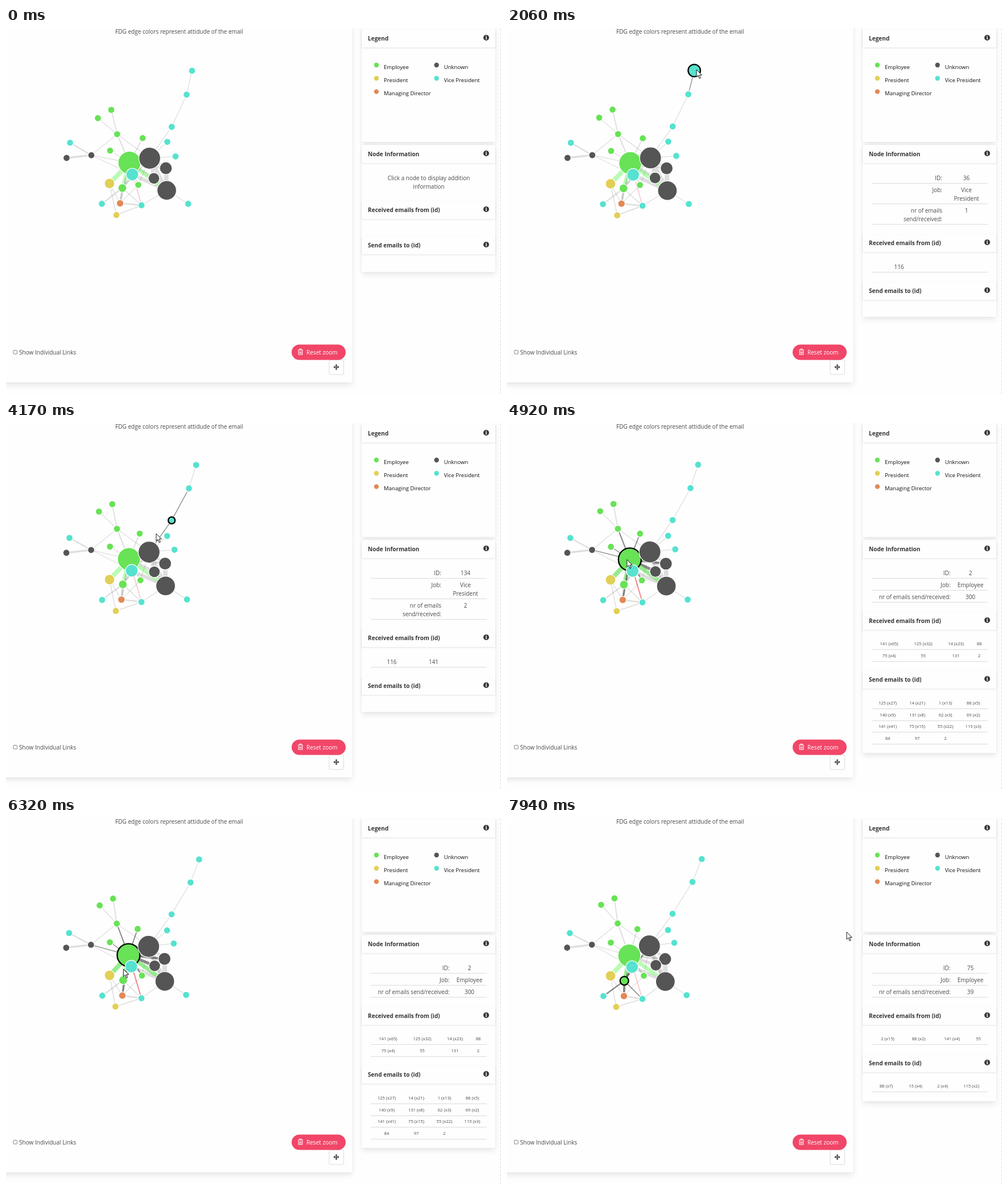
Write an HTML page that moves like this. It is 870 by 644 pixels and loops after 8000 ms.

```html
<!DOCTYPE html>
<html lang="en">
<head>
<meta charset="utf-8">
<title>Email graph</title>
<style>
  html, body { margin: 0; width: 100%; height: 100%; overflow: hidden; background: #fefefe; }
  body { position: relative; font: 10.05px "Open Sans", "Noto Sans", sans-serif; color: #4a4a4a; }
  div, svg { position: absolute; box-sizing: border-box; }
  svg { left: 0; top: 0; }
  text { fill: #4a4a4a; }
  .card { background: #fefefe; box-shadow: 0 5px 10px -1px rgba(10,10,10,.1), 0 0 0 1px rgba(10,10,10,.02); }
  .side { left: 625px; width: 235px; }
  .head { left: 625px; width: 235px; height: 31px; padding-left: 11px; line-height: 31px; font-size: 10.1px;
          font-weight: bold; color: #363636; box-shadow: 0 1px 3px rgba(10,10,10,.11); }
  .head::after { content: "i"; position: absolute; left: 214px; top: 9px; width: 10px; height: 10px; border-radius: 50%;
          background: #363636; color: #fff; font: bold 9px/10px "Noto Serif", serif; text-align: center; }
  .legend text { font-size: 9.6px; fill: #111; }
  .rule { stroke: #dbdbdb; }
</style>
</head>
<body>
<div class="card" style="left:-10px;top:-10px;width:619px;height:632px"></div>
<div class="card side" style="top:-5px;height:205px"></div>
<div id="panels"></div>
<svg id="stage" width="870" height="644">
  <path d="M869.5 1V644" stroke="#ddd" stroke-dasharray="4 3"/>
  <text x="304.300" y="10" text-anchor="middle">FDG edge colors represent attidude of the email</text>
  <g class="legend" id="legend"></g>
  <rect x="13" y="565.500" width="6.500" height="6.500" rx="1" fill="#fff" stroke="#767676" stroke-width=".9"/>
  <text x="23" y="573">Show Individual Links</text>
  <rect x="568" y="582.500" width="25.500" height="25.500" rx="2" fill="#fff" stroke="#dbdbdb"/>
  <path d="M576 595H585M580.500 590.500V599.500" stroke="#363636" stroke-width="1.300"/>
  <path d="M580.500 590l-2.200 2.400h4.400zM580.500 600l-2.200-2.400h4.400zM575.500 595l2.400-2.200v4.400zM585.500 595l-2.400-2.200v4.400z" fill="#363636"/>
  <rect x="502" y="555.500" width="95" height="27" rx="13.500" fill="#f14668"/>
  <path d="M513 565h9M516 565v-1.700h3V565M514.200 566v7h6.600v-7M516.500 567.500v4M518.500 567.500v4" fill="none" stroke="#fff" stroke-width="1.100"/>
  <text x="528" y="573" style="fill:#fff">Reset zoom</text>
  <g id="edges"></g><g id="nodes"></g>
  <path id="cursor" d="M0 0V13L3 10.200L5.200 15.500L7.300 14.600L5.100 9.500H9.300Z" fill="#fff" stroke="#000" stroke-width=".9"/>
</svg>
<script>
const LOOP = 8000;
const $ = id => document.getElementById(id);
const clamp = v => Math.max(0, Math.min(1, v));
const colors = { E: '#68e256', P: '#e2cf56', M: '#e28956', U: '#555', V: '#56e2cf' };

// Side panels
const head = (label, mid) => `<div class="head" style="top:${mid - 15}px">${label}</div>`;
const label = (x, mid, text, anchor = 'middle', size = 10) =>
  `<text x="${x}" y="${mid + size * .36}" text-anchor="${anchor}" font-size="${size}">${text}</text>`;
const rules = ys => ys.map(y => `<path class="rule" d="M641 ${y}H845"/>`).join('');
const cells = (mid, xs, texts, size = 7.6) =>
  texts.split('|').map((s, i) => label(xs[i], mid, s, 'middle', size)).join('');

const wideInfo = (id, count) =>
  label(765, 263, 'ID:', 'end') + label(807.5, 263, id) +
  label(765, 284, 'Job:', 'end') + label(807.5, 284, 'Vice') + label(807.5, 299, 'President') +
  label(765, 320.5, 'nr of emails', 'end') + label(765, 335.5, 'send/received:', 'end') + label(807.5, 320.5, count) +
  rules([272.5, 308.5, 344.5, 428.5]);
const shortInfo = (id, count) =>
  [['ID:', id], ['Job:', 'Employee'], ['nr of emails send/received:', count]].map(([name, value], i) =>
    label(779.5, 263 + i * 21, name, 'end') + label(814.5, 263 + i * 21, value)).join('') +
  rules([272.5, 293.5, 314.5]);

function addPanel(bottom, received, sent, content) {
  const panel = document.createElement('div');
  panel.innerHTML = `<div class="card side" style="top:205px;height:${bottom - 205}px"></div>` +
    head('Node Information', 221) + head('Received emails from (id)', received) + head('Send emails to (id)', sent) +
    `<svg width="870" height="644">${content}</svg>`;
  $('panels').append(panel);
  return panel;
}
const sentCols = [669, 721, 770.5, 819.5], receivedCols = [671.5, 731.5, 789, 830];
const panels = [
  [0, addPanel(428, 319, 381,
    label(743, 263, 'Click a node to display addition') + label(743, 278, 'information'))],
  [1620, addPanel(507, 377, 461, wideInfo(36, 1) + cells(419, [689], '116', 10))],
  [3260, addPanel(507, 377, 461, wideInfo(134, 2) + cells(419, [678, 751.5], '116|141', 10))],
  [4890, addPanel(579, 347, 450, shortInfo(2, 300) +
    cells(387.5, receivedCols, '141 (x65)|125 (x32)|14 (x23)|88') +
    cells(408, receivedCols, '75 (x4)|55|131|2') +
    cells(491, sentCols, '125 (x27)|14 (x21)|1 (x13)|88 (x5)') +
    cells(512, sentCols, '140 (x9)|131 (x8)|62 (x3)|69 (x2)') +
    cells(532.5, sentCols, '141 (x41)|75 (x15)|55 (x22)|115 (x3)') +
    cells(553, sentCols, '84|97|2') + rules([397.5, 418.5, 501.5, 522.5, 542.5, 563.5]))],
  [6620, addPanel(497, 347, 430, shortInfo(75, 39) +
    cells(387.5, [669, 723.5, 782, 828.5], '2 (x15)|88 (x2)|141 (x4)|55') +
    cells(470.5, [666.5, 718, 765.5, 816], '88 (x7)|15 (x4)|2 (x4)|115 (x2)') + rules([397.5, 480.5]))],
];
$('panels').insertAdjacentHTML('afterbegin', head('Legend', 18));

$('legend').innerHTML = [[0, 0, 'E', 'Employee'], [0, 1, 'P', 'President'], [0, 2, 'M', 'Managing Director'],
  [1, 0, 'U', 'Unknown'], [1, 1, 'V', 'Vice President']].map(([col, row, type, name]) =>
  `<circle cx="${651 + col * 105.7}" cy="${65 + row * 23.3}" r="4.200" fill="${colors[type]}"/>
   <text x="${664 + col * 105.7}" y="${71.5 + row * 23.2}">${name}</text>`).join('');

// Graph: key + type, start position, end position
const nodes = {};
const svgElement = (tag, parent, attrs) => {
  const el = document.createElementNS('http://www.w3.org/2000/svg', tag);
  setAttrs(el, attrs);
  parent.append(el);
  return el;
};
function setAttrs(el, attrs) { for (const k in attrs) el.setAttribute(k, attrs[k]); }

const radii = { f: 19, g: 11, h: 10, i: 17, l: 6.3, o: 7.5, p: 9, q: 11, r: 20 };
`rE 217 236.5 215 241.5
fU 252.5 228.5 250.3 224.5
aV 327 75 342.3 72
bV 317.5 117 326 112.2
cV 291.3 173.5 291 168
dV 283.5 199.8 283 196.6
eV 298 225.3 294 219
gU 281 246 278 247.5
iU 282.5 285 278.3 287
hU 260 263.8 261.6 258.3
jV 320.2 308.5 315.7 310.8
sE 232.5 275.3 240.5 276.7
pP 182 272.8 182 277
oE 204.5 280.8 206.2 285.6
qV 222 257 219.8 261.5
kV 238.2 311 238 317.5
lM 200.5 307.6 205.5 312.4
mP 194 328.2 192 331.5
nV 168.5 308.5 169.5 312.5
tE 183 215.2 182.5 218.7
uE 195.3 186.3 194.6 185
vE 161.5 158.2 165.4 152.3
wE 185 143.6 188.8 141
xE 240.2 193.2 229.2 195
yU 150 223.2 149.2 222.3
zU 106.5 228 105.7 227.5
AV 112.5 201.3 110.5 202`.split('\n').forEach(line => {
  const [name, ...pos] = line.split(' ');
  const key = name[0];
  nodes[key] = { from: pos.slice(0, 2).map(Number), to: pos.slice(2).map(Number), r: radii[key] || 6,
    el: svgElement('circle', $('nodes'), { fill: colors[name[1]] }) };
});

// Each edge: two node keys, line width, optional tone (g green, p pink)
const tones = {
  n: ['rgba(80,80,80,.18)', 'rgba(80,80,80,.68)'],
  g: ['rgba(130,250,120,.55)', 'rgba(110,230,100,.72)'],
  p: ['#f9d0d0', '#f28a8f'],
};
const edges = ('ab1.3 bc1.3 cf1.3 df1.3 ef1.3 fg5 fi7 gi8 fh5 hi5 rf6 rg4 rh5 qi6 ri7g rp8g ro6g ij1.3 ik1.3 rk2p ' +
  'kl2.5 km1.7 on2.3 ok1.5 ol3.5 rl3 oq3 of2.5 pm1.5 pl1.3 ru2 uf1.3 uv1.3 uw1.8 uy1.3 rx1.8 ry1.3 yq1.2 ' +
  'yA2.4 yz3.3 rt1.3 rs2 fs1.2 sl1.2').split(' ').map(code => {
  const [, a, b, width, tone] = code.match(/(.)(.)([\d.]+)(\w?)/);
  return { a, b, tone: tones[tone || 'n'], el: svgElement('line', $('edges'), { 'stroke-width': width }) };
});

// Timelines
const drift = [[1600, 0], [2060, .14], [3330, .35], [4920, .58], [5550, .72], [6950, .88], [7940, 1]];
const cursorPath = [[610, 688, 90], [1150, 330, 77], [1580, 333, 73], [2100, 333, 73], [2340, 327, 86],
  [3260, 291, 170], [3850, 291, 171], [4800, 211, 239.5], [5550, 210, 240.5], [5900, 210, 240],
  [6600, 204, 282], [7400, 204, 282], [7650, 778, 348], [7940, 597, 200]];
const selections = [[0, ''], [1150, 'a'], [3260, 'c'], [4890, 'r'], [6620, 'o']];
const hovers = { a: [1150, 2100], c: [3300, 3850], o: [6620, 7400] };

const current = (list, t) => list.filter(([start]) => start <= t).pop()[1];
function sample(keys, t) {
  const next = keys.findIndex(k => k[0] > t);
  if (next === 0) return keys[0].slice(1);
  if (next < 0) return keys[keys.length - 1].slice(1);
  const a = keys[next - 1], b = keys[next], u = (t - a[0]) / (b[0] - a[0]);
  return a.slice(1).map((v, i) => v + (b[i + 1] - v) * u);
}
const growth = (key, t) => {
  if (!hovers[key]) return 0;
  const [enter, leave] = hovers[key];
  return 4.8 * (clamp((t - enter) / 250) - clamp((t - leave) / 250));
};

function draw(t) {
  const [progress] = sample(drift, t);
  const selected = current(selections, t), panel = current(panels, t);
  for (const [, el] of panels) el.style.display = el === panel ? '' : 'none';

  for (const key in nodes) {
    const n = nodes[key], on = key === selected;
    n.x = n.from[0] + (n.to[0] - n.from[0]) * progress;
    n.y = n.from[1] + (n.to[1] - n.from[1]) * progress;
    setAttrs(n.el, { cx: n.x, cy: n.y, r: n.r + growth(key, t),
      stroke: on ? '#000' : '#fff', 'stroke-width': on ? 2.3 : 1.2 });
  }
  for (const { a, b, tone, el } of edges) {
    const p = nodes[a], q = nodes[b];
    setAttrs(el, { x1: p.x, y1: p.y, x2: q.x, y2: q.y, stroke: tone[+(a === selected || b === selected)] });
  }
  const [x, y] = sample(cursorPath, t);
  setAttrs($('cursor'), { transform: `translate(${x} ${y})`, visibility: t < 610 ? 'hidden' : 'visible' });
}

const start = performance.now();
function frame() {
  draw((performance.now() - start) % LOOP);
  requestAnimationFrame(frame);
}
frame();
</script>
</body>
</html>
```
